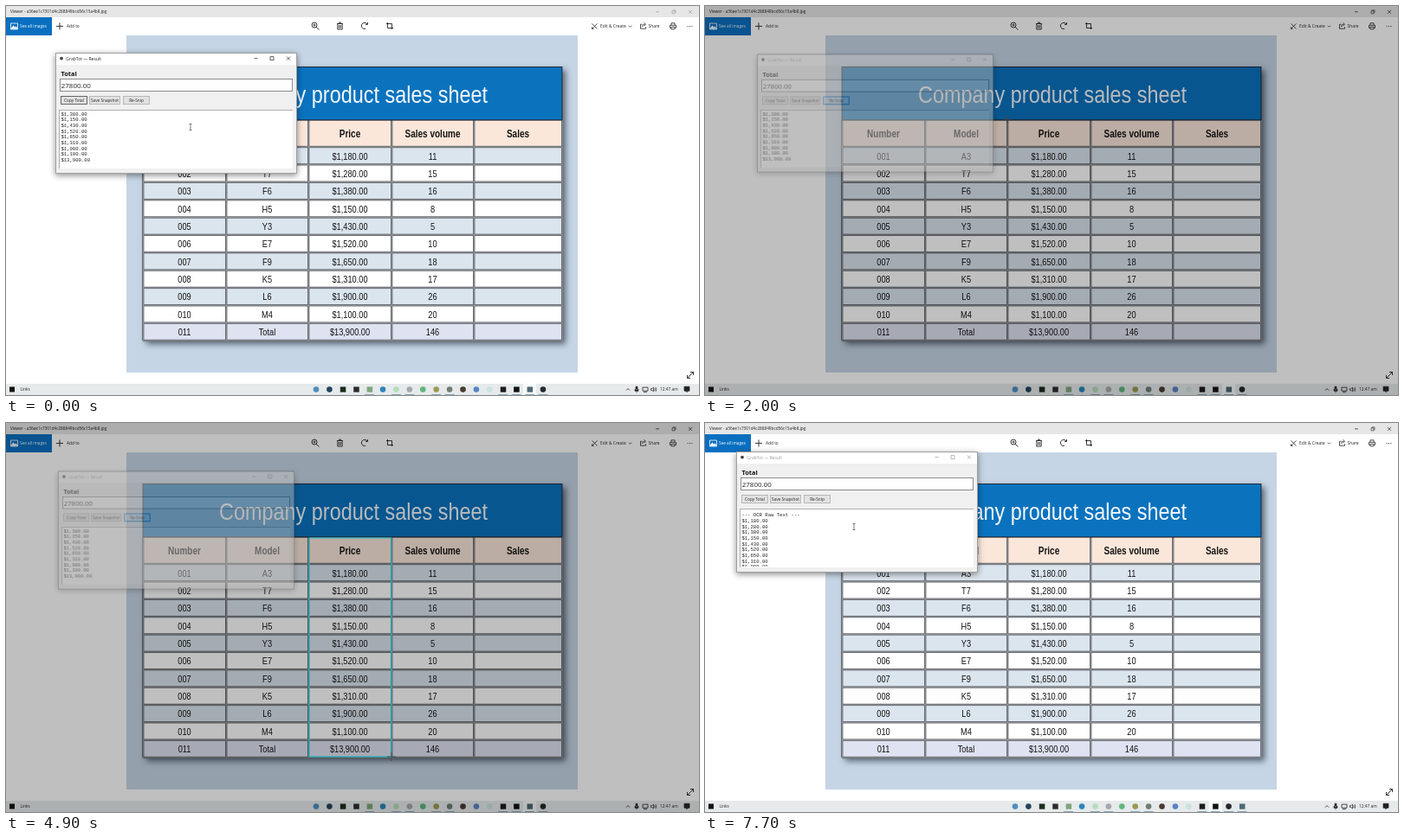
Animation, 800 px wide and 450 px high, one loop 8000 ms. Source, as an HTML page with a canvas:

```html
<!DOCTYPE html>
<html lang="en">
<head>
<meta charset="utf-8">
<title>Sales sheet capture</title>
<style>
  html, body { margin: 0; width: 100%; height: 100%; overflow: hidden; background: #fff; }
  canvas { display: block; width: 800px; height: 450px; }
</style>
</head>
<body>
<canvas id="stage" width="800" height="450"></canvas>
<script>
const LOOP = 8000, STEP = 100;
const UI = '"Open Sans", sans-serif';
const ARIAL = '"Liberation Sans", sans-serif';
const MONO = '"Liberation Mono", monospace';
const SQUEEZE = 0.84; // the sheet is shown narrower than it was typeset

const stage = document.getElementById('stage').getContext('2d');
const WIN_W = 279, WIN_H = 140;
const panel = document.createElement('canvas');
panel.width = WIN_W;
panel.height = WIN_H;
const panelCtx = panel.getContext('2d');
let g = stage;

function rect(x, y, w, h, fill, stroke) {
  if (fill) { g.fillStyle = fill; g.fillRect(x, y, w, h); }
  if (stroke) {
    g.strokeStyle = stroke;
    g.lineWidth = 1;
    g.strokeRect(x + 0.5, y + 0.5, w - 1, h - 1);
  }
}

function disc(x, y, r, fill) {
  g.fillStyle = fill;
  g.beginPath();
  g.arc(x, y, r, 0, 7);
  g.fill();
}

function path(d, x, y, color = '#222', width = 0.9, fill) {
  const p = new Path2D(d);
  g.save();
  g.translate(x, y);
  if (fill) { g.fillStyle = fill; g.fill(p); }
  g.strokeStyle = color;
  g.lineWidth = width;
  g.stroke(p);
  g.restore();
}

// y is the middle of the capitals; layout is done at 10x for even spacing
function text(s, x, y, size, { font = UI, weight = 400, color = '#222', align = 'left', sx = 1 } = {}) {
  g.save();
  g.translate(x, y + size * 0.36);
  g.scale(0.1 * sx, 0.1);
  g.font = `${weight} ${size * 10}px ${font}`;
  g.textAlign = align;
  g.fillStyle = color;
  g.fillText(s, 0, 0);
  g.restore();
}

// ---- sheet ----
const COLS = [158, 254, 349, 445, 540, 642];
const HEADS = ['Number', 'Model', 'Price', 'Sales volume', 'Sales'];
const MODELS = ['A3', 'T7', 'F6', 'H5', 'Y3', 'E7', 'F9', 'K5', 'L6', 'M4', 'Total'];
const PRICES = [1180, 1280, 1380, 1150, 1430, 1520, 1650, 1310, 1900, 1100, 13900];
const VOLUMES = [11, 15, 16, 8, 5, 10, 18, 17, 26, 20, 146];
const money = n => n.toLocaleString('en-US') + '.00';

function sheet() {
  const top = 163, rowH = 224 / 11;
  const cell = (s, col, y, size, weight) => text(s, (COLS[col] + COLS[col + 1]) / 2, y, size,
    { font: ARIAL, weight, align: 'center', color: '#141414', sx: SQUEEZE });

  rect(139, 34, 521, 390, '#c5d5e5');
  g.save();
  g.shadowColor = 'rgba(50,60,75,.75)';
  g.shadowBlur = 7;
  g.shadowOffsetX = g.shadowOffsetY = 4;
  rect(158, 70, 484, 317, '#fff');
  g.restore();

  rect(158, 70, 484, 62, '#0b73be');
  text('Company product sales sheet', 401, 101.7, 27.9,
    { font: ARIAL, color: '#f4f8fc', align: 'center', sx: SQUEEZE });
  rect(158, 132, 484, 31, '#fbe7da');
  HEADS.forEach((s, i) => cell(s, i, 148, 11.9, 700));

  MODELS.forEach((model, i) => {
    const y = top + i * rowH, mid = y + rowH / 2 + 0.4;
    rect(158, y, 484, rowH, i === 10 ? '#dee2f1' : i % 2 ? '#fff' : '#dbe5ee');
    [String(i + 1).padStart(3, '0'), model, '$' + money(PRICES[i]), String(VOLUMES[i])]
      .forEach((s, c) => cell(s, c, mid, 11));
  });

  // double rules: a dark band with a lighter core
  const rules = (width, color) => {
    for (let i = 0; i <= 11; i++) rect(158, top + i * rowH - width / 2, 484, width, color);
    COLS.forEach(x => rect(x + 0.2 - width / 2, 132, width, 255, color));
  };
  rules(2.4, '#63666b');
  rules(0.7, '#a2a6ab');
  g.fillStyle = '#222c38';
  g.fillRect(158, 70, 484, 1);
  g.fillRect(158, 131.3, 484, 1.3);
  g.fillRect(157.6, 70, 1, 62);
  g.fillRect(641.4, 70, 1, 62);
}

// ---- viewer chrome ----
function viewer(active) {
  rect(0, 0, 800, 450, '#fff');
  rect(0, 0, 800, 13, '#e6e6e6');
  text('Viewer - a36ee1c7301d4c288849bcd56c15a4b8.jpg', 5, 6.7, 4.7);
  const btn = active ? '#222' : '#999';
  path('M-2 0H2', 752, 6.8, btn, 0.7);
  path('M-2-1H1V2H-2ZM-1-1V-2H2V1H1', 771, 6.8, btn, 0.6);
  path('M-2-2L2 2M2-2L-2 2', 790, 6.8, btn, 0.7);

  rect(0, 13, 53, 21, '#0a6fc0');
  path('M-4-3.5H4V3.5H-4Z', 9.5, 23.5, '#fff', 0.8);
  path('M-4 3L-1-1L1 1.5L2 0L4 3Z', 9.5, 23.5, '#fff', 0.3, '#fff');
  text('See all images', 16, 23.4, 4.7, { color: '#fff' });
  path('M-4 0H4M0-4V4', 62, 23.4);
  text('Add to', 70, 23.4, 4.8);

  path('M2-1A3 3 0 1 1-4-1A3 3 0 1 1 2-1M1 1.2L4.5 4.5M-2.5-1H.5M-1-2.5V.5', 357, 23);
  path('M-3.5-2.5H3.5M-1-2.5V-4H1V-2.5M-2.7-2.5V4H2.7V-2.5M-.9-1V2.7M.9-1V2.7', 385.5, 23);
  path('M3-2A3.6 3.6 0 1 0 1 3.4M3.5-4V-1.6H1', 414, 23);
  path('M-2.5-4V2.5H4M-4-2.5H2.5V4', 443, 23);
  path('M-3-3L3 3M3-3L-3 3M-3 1V3H-1', 679.5, 23.4, '#222', 0.8);
  text('Edit & Create', 686, 23.4, 4.9);
  path('M-1.7-.8L0 .9L1.7-.8', 720.5, 23.4, '#222', 0.7);
  path('M-1-2H-3V3H3V1M-1 1Q-1-2 2-2M1-4L3-2L1 0', 735.5, 23.2, '#222', 0.8);
  text('Share', 741.5, 23.4, 4.9);
  path('M-2-1V-3.5H2V-1M-2 2H-3.5V-1H3.5V2H2M-2 1H2V3.5H-2Z', 770, 23.3, '#222', 0.8);
  [-2.4, 0, 2.4].forEach(d => disc(789.5 + d, 23.5, 0.6, '#222'));
  path('M-3.5 3.5L3.5-3.5M0-3.5H3.5V0M-3.5 0V3.5H0', 790, 427);
}

// ---- taskbar ----
const APPS = ['#4d8ec0', '#24445f', '#1c2a1c', '#2b2b2b', '#7fa57c', '#2d86b8', '#b5dcb8', '#a5a8aa', '#5fb67c',
  '#9b9a55', '#6f7d76', '#4a3a32', '#5a83c4', '#c9e2e0', '#1b1b1b', '#111', '#4c6873', '#25292c'];
const SQUARES = [2, 3, 4, 14, 15];
const RUNNING = [4, 6, 7, 9, 10, 14, 15, 16, 17];

function taskbar(reopened) {
  rect(0, 437, 800, 13, '#e6eaeb');
  rect(4, 440.5, 6, 6, '#111');
  text('Links', 16.5, 443.7, 4.7);
  const front = reopened ? 15 : 16;
  const tool = reopened ? 17 : 16;
  APPS.forEach((color, i) => {
    const x = 358 + i * 15.41;
    if (i === front) rect(x - 7.5, 437, 15, 13, '#f8fafa');
    if (RUNNING.includes(i)) rect(x - 5.5, 449, 11, 1, '#8aa9bd');
    if (SQUARES.includes(i) || i === tool) rect(x - 3, 440.5, 6.5, 6.2, i === tool ? APPS[16] : color);
    else disc(x, 443.6, 3.3, i > 15 ? APPS[17] : color);
  });
  path('M-2 1L0-1L2 1', 718, 443.6, '#222', 0.8);
  path('M-1-3H1V1H-1ZM-2 0V2H2V0M0 2V4', 728, 443.3, '#222', 0.7, '#222');
  path('M-3-2H3V2H-3ZM-2 3.5H2', 738, 443.2, '#222', 0.8);
  path('M-3-1H-1.5L0-2.5V2.5L-1.5 1H-3ZM1.2-1.5Q2.2 0 1.2 1.5M2.5-2.5Q4 0 2.5 2.5', 747.5, 443.6, '#222', 0.7);
  text('12:47 am', 755, 443.7, 4.8);
  path('M-3-3H3V2H1L0 3.5L-1 2H-3Z', 786, 443.3, '#222', 0.7, '#222');
}

// ---- result window ----
const LINE = 6.67, NOTCH = 16.67;
const LOG = [
  'Parsed numbers (included):',
  ...PRICES.map(p => `  ${(p + '.00').padEnd(10)} \u2190 from '${money(p)}'`),
  '',
  '--- OCR Raw Text ---',
  ...PRICES.map(p => '$' + money(p)),
];
const BUTTONS = [['Copy Total', 6, 31], ['Save Snapshot', 39, 36], ['Re-Snip', 78, 31]];

function drawPanel({ scroll, active, focus, hover }) {
  g = panelCtx;
  const ink = active ? '#222' : '#9a9a9a';
  rect(0, 0, WIN_W, WIN_H, '#f0f0f0');
  rect(0, 0, WIN_W, 14, '#fff');
  disc(7, 6.6, 1.9, '#3c4650');
  text('GrabTot \u2014 Result', 12.3, 6.8, 5, { color: ink });
  path('M-2 0H2', 231.5, 6.6, ink, 0.7);
  path('M-2-2H2V2H-2Z', 250, 6.6, ink, 0.7);
  path('M-2-2L2 2M2-2L-2 2', 269, 6.6, ink, 0.7);
  text('Total', 6.4, 24.7, 7.4, { weight: 700, color: '#111' });
  rect(5, 30, 269, 15, '#fff', '#8c8c8c');
  text('27800.00', 6.7, 37.9, 8);

  BUTTONS.forEach(([label, x, w], i) => {
    const lit = i === hover;
    rect(x, 50, w, 10, lit ? '#dcecf8' : '#e2e2e2', lit ? '#1c7ecb' : i === focus ? '#666' : '#b8b8b8');
    text(label, x + w / 2, 55.1, 4.7, { align: 'center' });
  });

  rect(4, 66, 270, 68, '#fff');
  rect(4, 66, 270, 1, '#b0b0b0');
  rect(4, 66, 1, 68, '#b0b0b0');
  g.save();
  g.beginPath();
  g.rect(5, 67, 268, 66);
  g.clip();
  LOG.forEach((s, i) => text(s, 6.4, 70 + i * LINE - scroll, 5.6, { font: MONO }));
  g.restore();
  rect(0, 0, WIN_W, WIN_H, null, '#a0a0a0');
  g = stage;
}

function showPanel(x, y, alpha, scale, state) {
  drawPanel(state);
  g.save();
  g.globalAlpha = alpha;
  g.translate(x + WIN_W / 2, y + WIN_H / 2);
  g.scale(scale, scale);
  g.translate(-WIN_W / 2, -WIN_H / 2);

  // the shadow falls only outside, so it cannot show through the window
  g.save();
  g.beginPath();
  g.rect(-20, -20, WIN_W + 40, WIN_H + 40);
  g.rect(0, 0, WIN_W, WIN_H);
  g.clip('evenodd');
  g.shadowColor = 'rgba(0,0,0,.45)';
  g.shadowBlur = 7;
  g.shadowOffsetY = 2;
  rect(0, 0, WIN_W, WIN_H, '#000');
  g.restore();

  g.drawImage(panel, 0, 0);
  g.restore();
}

// ---- pointer ----
const MOVES = [
  [0, 213, 140], [500, 150, 109], [1000, 150, 109], [1200, 315, 139], [1900, 349, 131], [2000, 349, 131],
  [3300, 445, 370], [4900, 445, 386], [5000, 445, 386], [5500, 272, 233], [6100, 172, 120], [LOOP, 172, 120],
];

const slope = (i, c) => (MOVES[i + 1][c] - MOVES[i][c]) / (MOVES[i + 1][0] - MOVES[i][0]);

// speed through a point: carries on through a turn-free path, rests elsewhere
function speed(i, c) {
  if (i === 0 || i === MOVES.length - 1) return 0;
  const a = slope(i - 1, c), b = slope(i, c);
  return a * b > 0 ? 2 * a * b / (a + b) : 0;
}

function pointerAt(t) {
  const i = MOVES.findIndex(m => m[0] > t) - 1;
  const span = MOVES[i + 1][0] - MOVES[i][0];
  const k = (t - MOVES[i][0]) / span, r = 1 - k;
  return [1, 2].map(c =>
    MOVES[i][c] * r * r * (1 + 2 * k) + MOVES[i + 1][c] * k * k * (3 - 2 * k) +
    span * k * r * (speed(i, c) * r - speed(i + 1, c) * k));
}

function pointer(kind, x, y) {
  if (kind === 'cross') path('M-5 0H5M0-5V5', x, y, '#484848', 0.8);
  else if (kind === 'beam') path('M-1.5-3.5H1.5M0-3.5V3.5M-1.5 3.5H1.5', x, y, '#444', 0.7);
  else path('M0 0V6.4L1.5 5L2.5 7.2L3.5 6.8L2.6 4.7H4.6Z', x, y - 3, '#444', 0.6, '#fff');
}

// ---- timeline ----
const DIM_ON = 1100, DRAG = 2000, DIM_OFF = 5000, REOPEN = 5500;
const NOTCHES = [6500, 6900, 7100, 7300, 7600];

function draw(t) {
  const [x, y] = pointerAt(t);
  const dim = t >= DIM_ON && t < DIM_OFF;
  const reopened = t >= REOPEN;
  let kind = dim ? 'cross' : 'arrow';

  viewer(t >= DIM_ON);
  sheet();
  taskbar(reopened);

  if (t < DIM_OFF) {
    const hover = t >= 400 ? 2 : -1;
    showPanel(57, 54, dim ? 0.5 : 1, dim ? 0.978 : 1,
      { scroll: 106, active: !dim, focus: hover < 0 ? 0 : 2, hover });
    if (!dim && y > 121) kind = 'beam';
  } else if (reopened) {
    const scroll = NOTCHES.filter(n => t >= n).length * NOTCH;
    showPanel(36, 33, t < REOPEN + STEP ? 0.93 : 1, 1, { scroll, active: false, focus: -1, hover: -1 });
    if (x < 309 && y < 166) kind = 'beam';
  }

  if (dim) {
    rect(0, 0, 800, 450, 'rgba(0,0,0,.25)');
    if (t > DRAG && y > 133) {
      g.strokeStyle = '#1fc3cf';
      g.lineWidth = 1.1;
      g.strokeRect(350, 133, x - 350, y - 133);
    }
  }
  pointer(kind, x, y);
}

const start = performance.now();
function tick() {
  const t = (performance.now() - start) % LOOP;
  draw(Math.floor(t / STEP) * STEP);
  requestAnimationFrame(tick);
}
tick();
</script>
</body>
</html>
```
